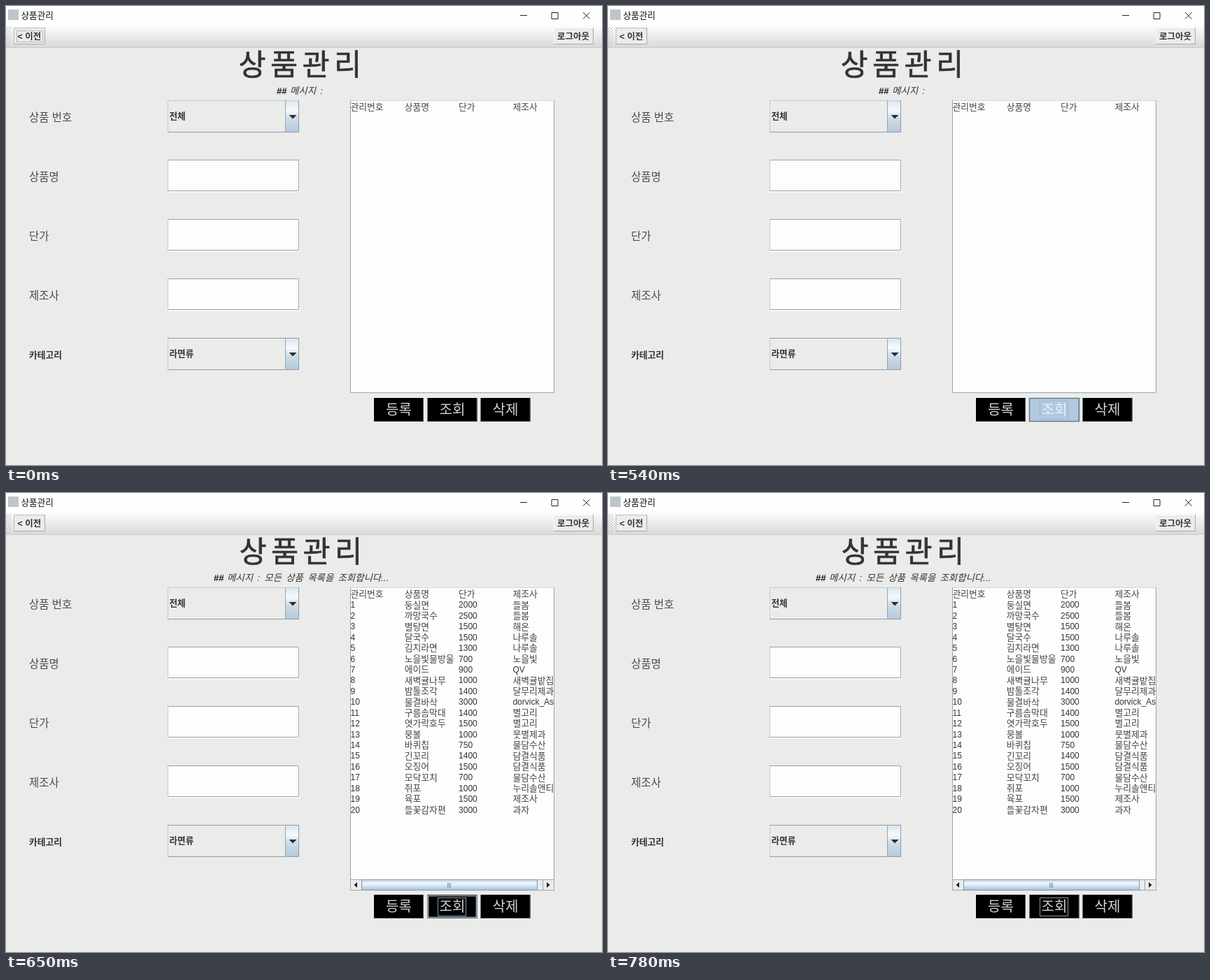
An HTML page for the animation above (1580 ms loop, 852 by 657 pixels).

```html
<!DOCTYPE html>
<html lang="ko">
<head>
<meta charset="utf-8">
<title>상품관리</title>
<style>
html, body { margin: 0; width: 100%; height: 100%; overflow: hidden; background: #ebebea; }
svg { display: block; width: 852px; height: 657px; }
text {
  font-family: "Liberation Sans", "Noto Sans CJK KR", "Noto Sans CJK", "Noto Sans KR", sans-serif;
  white-space: pre;
}
</style>
</head>
<body>
<svg id="stage" viewBox="0 0 852 657" xmlns="http://www.w3.org/2000/svg">
  <defs>
    <linearGradient id="bar" x2="0" y2="1">
      <stop offset="0" stop-color="#fcfcfc"/><stop offset="1" stop-color="#d9d9d8"/>
    </linearGradient>
    <linearGradient id="blue" x2="0" y2="1">
      <stop offset="0" stop-color="#dbe6ef"/><stop offset=".3" stop-color="#f7fafc"/>
      <stop offset=".55" stop-color="#cfdde8"/><stop offset="1" stop-color="#b5cadb"/>
    </linearGradient>
    <linearGradient id="thumb" x2="0" y2="1">
      <stop offset="0" stop-color="#c3d6e8"/><stop offset=".35" stop-color="#f2f7fb"/>
      <stop offset="1" stop-color="#a9c3da"/>
    </linearGradient>
    <pattern id="grip" width="4" height="4" patternUnits="userSpaceOnUse">
      <path d="M0 0h1v1h-1zM2 2h1v1h-1z" fill="#999"/>
      <path d="M1 1h1v1h-1zM3 3h1v1h-1z" fill="#fff"/>
    </pattern>
    <clipPath id="listClip"><rect x="492" y="135" width="291" height="418"/></clipPath>
  </defs>
</svg>
<script>
const LOOP = 1580, FOCUS_END = 540, LOADED = 630;
const stage = document.getElementById('stage');

function add(parent, tag, attrs) {
  const el = document.createElementNS('http://www.w3.org/2000/svg', tag);
  for (const k in attrs) el.setAttribute(k, attrs[k]);
  parent.append(el);
  return el;
}
const group = (parent = stage) => add(parent, 'g', {});
const rect = (p, x, y, width, height, fill) => add(p, 'rect', { x, y, width, height, fill });
const frame = (p, x, y, w, h, stroke, sw = 1) =>
  add(p, 'rect', { x: x + .5, y: y + .5, width: w - 1, height: h - 1, fill: 'none', stroke, 'stroke-width': sw });
const path = (p, d, stroke, fill = 'none') => add(p, 'path', { d, stroke, fill });

// Text is placed by its left edge and vertical centre.
function label(p, str, x, mid, size, attrs = {}) {
  const el = add(p, 'text', { x, y: mid + size * .37, 'font-size': size, fill: '#333', ...attrs });
  el.textContent = str;
  return el;
}

// Visible only from one time to another.
function show(el, from, to) {
  const steps = [{ opacity: from > 0 ? 0 : 1, offset: 0 }];
  if (from > 0) steps.push({ opacity: 1, offset: from / LOOP });
  if (to < LOOP) steps.push({ opacity: 0, offset: to / LOOP });
  steps.push({ opacity: to < LOOP ? 0 : 1, offset: 1 });
  for (const s of steps) s.easing = 'step-end';
  el.animate(steps, { duration: LOOP, iterations: Infinity });
}

const bold = { 'font-weight': 700 };
const light = { 'font-weight': 300 };

function titleBar() {
  rect(stage, 0, 0, 852, 28, '#fefefe');
  rect(stage, 3, 5, 15, 15, '#bcc6cd');
  label(stage, '상품관리', 21.5, 13.5, 12.6, { fill: '#111' });
  path(stage, 'M735 13.5h10M780 9.5h9v9h-9zM825 9l9.5 9.5M834.5 9l-9.5 9.5', '#222');
}

function toolButton(x, w, str, tx, edge) {
  rect(stage, x, 31, w, 24, '#ececeb');
  path(stage, `M${x + .5} 55V31.5H${x + w}`, edge);
  path(stage, `M${x} 54.5H${x + w - .5}V31`, '#a2aab0');
  label(stage, str, tx, 43, 12.5, bold);
}

function toolBar() {
  rect(stage, 0, 28, 852, 31, 'url(#bar)');
  rect(stage, 0, 59, 852, 1, '#c9cac9');
  rect(stage, 0, 30, 8, 27, 'url(#grip)');
  toolButton(11, 45, '< 이전', 16.5, '#b9c1c7');
  toolButton(783, 57, '로그아웃', 788, '#f8f8f8');
  show(frame(stage, 15, 35, 38, 17, '#a6bccd'), 0, FOCUS_END);
}

function heading() {
  const before = group(), after = group();
  const big = { 'letter-spacing': 6.4, stroke: '#333', 'stroke-width': .7 };
  const slant = { 'font-style': 'italic', 'word-spacing': 2.6 };
  const line = (g, x, str) => {
    label(g, '##', x, 121, 13, { ...bold, fill: '#111' });
    label(g, str, x + 19, 121, 13.4, slant);
  };
  label(before, '상품관리', 332.5, 83.5, 42.5, big);
  line(before, 387, '메시지 :');
  label(after, '상품관리', 333.5, 83.5, 42.5, big);
  line(after, 297, '메시지 : 모든 상품 목록을 조회합니다...');
  show(before, 0, LOADED);
  show(after, LOADED, LOOP);
}

function combo(y, str, top) {
  rect(stage, 231, y, 188, 46, '#ebebea');
  path(stage, `M231.5 ${y + 46}V${y + .5}`, '#b9cddc');
  path(stage, `M231 ${y + .5}H419`, top);
  path(stage, `M231 ${y + 45.5}H418.5V${y}`, '#8b9dac');
  rect(stage, 400, y + 1, 18, 44, 'url(#blue)');
  path(stage, `M399.5 ${y}v46`, '#8fa5b7');
  path(stage, `M404.5 ${y + 21}h11l-5.5 5.5z`, 'none', '#2b2f33');
  label(stage, str, 233.5, y + 22.5, 12.6, bold);
}

function field(y) {
  rect(stage, 231, y, 189, 47, '#f8f8f8');
  rect(stage, 231, y, 188, 45, '#fdfdfd');
  path(stage, `M231.5 ${y + 45}V${y}`, '#c4ccd2');
  path(stage, `M231 ${y + .5}H418.5V${y + 44.5}H231`, '#9aa5ae');
}

function form() {
  const names = ['상품 번호', '상품명', '단가', '제조사'];
  names.forEach((s, i) =>
    label(stage, s, 33, 159.5 + 85 * i, 15.5, { ...light, fill: '#4c4c4c' }));
  label(stage, '카테고리', 33, 499, 12.8, bold);
  combo(135, '전체', '#b9cddc');
  [220, 305, 390].forEach(field);
  combo(475, '라면류', '#8b9dac');
}

const goods = [
  ['둥실면', 2000, '들봄'],
  ['까망국수', 2500, '들봄'],
  ['별탕면', 1500, '해온'],
  ['달국수', 1500, '나루솔'],
  ['김치라면', 1300, '나루솔'],
  ['노을빛물방울', 700, '노을빛'],
  ['에이드', 900, 'QV'],
  ['새벽귤나무', 1000, '새벽귤밭집'],
  ['밤톨조각', 1400, '달무리제과'],
  ['물결바삭', 3000, 'dorvick_As'],
  ['구름솜막대', 1400, '별고리'],
  ['엿가락호두', 1500, '별고리'],
  ['뭉볼', 1000, '뭇별제과'],
  ['바퀴칩', 750, '물담수산'],
  ['긴꼬리', 1400, '담결식품'],
  ['오징어', 1500, '담결식품'],
  ['모닥꼬치', 700, '물담수산'],
  ['쥐포', 1000, '누리솔앤티'],
  ['육포', 1500, '제조사'],
  ['들꽃감자편', 3000, '과자']
];

function row(p, cells, mid) {
  cells.forEach((c, i) => {
    const latin = /^\w+$/.test(c);
    label(p, c, 492.5 + 77.3 * i, mid, latin ? 12 : 12.8, latin ? {} : { ...light, fill: '#444' });
  });
}

function scrollBar(p) {
  rect(p, 492, 553, 292, 16, '#ebebea');
  frame(p, 492, 553, 292, 16, '#9aa8b4');
  rect(p, 508, 554, 252, 14, 'url(#thumb)');
  frame(p, 508, 553, 252, 16, '#7f9bb3');
  path(p, 'M767.5 553v16', '#9aa8b4');
  path(p, 'M502 557v8l-4.5-4zM773 557v8l4.5-4z', 'none', '#222');
  path(p, 'M631.5 558v7M633.5 558v7M635.5 558v7', '#7590a8');
}

function list() {
  rect(stage, 492, 135, 292, 419, '#fdfdfd');
  path(stage, 'M492 135.5H784', '#d3d8dc');
  path(stage, 'M492.5 135V553.5H783.5V135', '#98a3ac');
  const view = add(stage, 'g', { 'clip-path': 'url(#listClip)' });
  row(view, ['관리번호', '상품명', '단가', '제조사'], 144);
  const loaded = group(view);
  goods.forEach((g, i) => row(loaded, [i + 1, ...g], 160 + 15.43 * i));
  const bar = group();
  scrollBar(bar);
  show(loaded, LOADED, LOOP);
  show(bar, LOADED, LOOP);
}

function button(p, x, y, str, face = '#000', ink = '#d4d4d4') {
  rect(p, x, y, 71, 34, face);
  path(p, `M${x} ${y + 33.5}H${x + 70.5}V${y}`, face === '#000' ? '#555' : '#8095a8');
  label(p, str, x + 17, y + 17, 20, { ...light, fill: ink });
}

function actions(y, from, to) {
  const g = group();
  button(g, 526, y, '등록');
  button(g, 602.5, y, '조회');
  button(g, 678.5, y, '삭제');
  show(g, from, to);
}

function pointer() {
  const hover = (y, from, to) => show(frame(stage, 603, y + 1, 70, 32, '#93abc1', 1.6), from, to);
  actions(561, 0, LOADED);
  actions(575, LOADED, LOOP);
  hover(561, 200, FOCUS_END);
  hover(575, LOADED, 740);

  const pressed = group();
  button(pressed, 602.5, 561, '조회', '#b1c8df', '#e9eff5');
  frame(pressed, 602, 561, 72, 34, '#60788d', 1.4);
  frame(pressed, 617, 565, 41, 27, '#9fb7cd');
  show(pressed, FOCUS_END, LOADED);

  show(frame(stage, 617, 579, 41, 27, '#8499ab'), LOADED, LOOP);
}

titleBar();
toolBar();
heading();
form();
list();
pointer();
</script>
</body>
</html>
```
